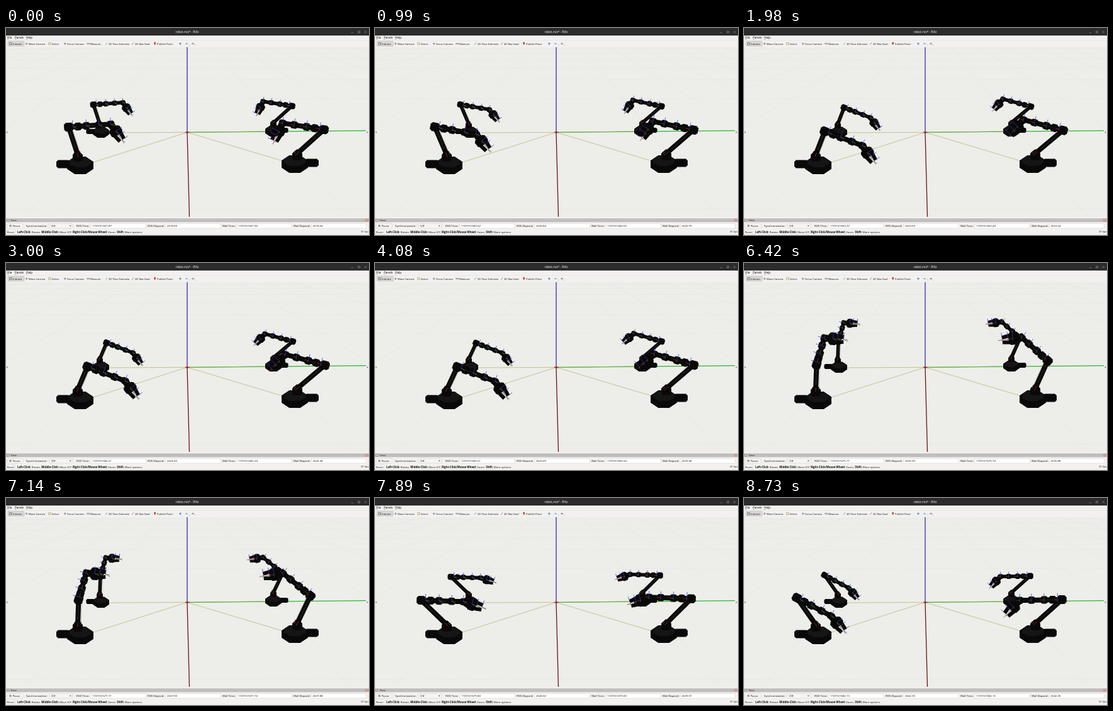
An HTML page with a canvas that plays this animation: 577x330 px, repeating every 8.76 s.

```html
<!DOCTYPE html>
<html lang="en">
<head>
<meta charset="utf-8">
<title>robot.rviz* - RViz</title>
<style>
html, body { margin: 0; width: 100%; height: 100%; overflow: hidden; background: #f2f1f0; }
canvas, svg { position: absolute; left: 0; top: 0; width: 577px; height: 330px; }
text { font: 4.35px "Open Sans", "Noto Sans", sans-serif; fill: #0c0c0c; white-space: pre; }
.menu { font-size: 4.6px; }
.tool { font-size: 4.1px; }
.title { font-size: 4.6px; font-weight: 600; fill: #d4d4d4; text-anchor: middle; }
.bold { font-weight: 700; }
</style>
</head>
<body>
<canvas id="scene"></canvas>
<svg id="ui" viewBox="0 0 577 330"></svg>
<script>
const LOOP = 8760, STEP = 30, RATE = 2.779;
const canvas = document.getElementById('scene');
const ui = document.getElementById('ui');
const g = canvas.getContext('2d');
const dpr = window.devicePixelRatio || 1;
canvas.width = 577 * dpr;
canvas.height = 330 * dpr;

// ---------- window frame ----------
function add(tag, attrs, text = '') {
  const el = document.createElementNS('http://www.w3.org/2000/svg', tag);
  for (const k in attrs) el.setAttribute(k, attrs[k]);
  el.textContent = text;
  return ui.appendChild(el);
}
const rect = (x, y, width, height, fill, stroke = 'none', rx = 0) =>
  add('rect', { x, y, width, height, fill, stroke, rx, 'stroke-width': 0.4 });
const label = (x, y, text, name = '') => add('text', { x, y, class: name }, text);
const path = (d, stroke, w = 0.6, fill = 'none') =>
  add('path', { d, stroke, fill, 'stroke-width': w });
const field = (x, width, fill = '#f6f5f4') => rect(x, 311.8, width, 7.4, fill, '#c4c1be', 1);

function buildTop() {
  rect(0, 0, 577, 12, '#2c2c2c');
  label(288, 8.2, 'robot.rviz* - RViz', 'title');
  path('M549 7.5h2.6M559.6 5h2.8v2.8h-2.8zM570 5l2.8 2.8M572.8 5l-2.8 2.8', '#b8b8b8', 0.5);

  rect(0, 12, 577, 18.5, '#f2f1f0');
  for (const [x, s] of [[2, 'File'], [14, 'Panels'], [32, 'Help']]) {
    label(x, 17.1, s, 'menu');
    path(`M${x} 18h2.4`, '#333', 0.35);
  }
  path('M0 19.7H577', '#dddbd9', 0.4);
  rect(3, 21, 26, 8, '#d9d7d5', '#aaa7a4', 1);

  const box = 'M0 -1.6h3.6v3.2h-3.6z', cross = 'M0 0h4M2 -2v4', slash = 'M0 1.7L3.6 -1.7';
  const pin = 'M2 2L.8 -1A1.2 1.2 0 1 1 3.2 -1z', ruler = 'M0 .7h4.2v-1.4h-4.2z';
  const tools = [[11, 'Interact', '#555', box], [36, 'Move Camera', '#666', cross], [73, 'Select', '#9a9a50', box],
    [97, 'Focus Camera', '#666', cross], [134, 'Measure', '#777', ruler], [163, '2D Pose Estimate', '#2d9b2d', slash],
    [205, '2D Nav Goal', '#a03a90', slash], [240, 'Publish Point', '#c43a2c', pin]];
  for (const [x, s, color, mark] of tools) {
    label(x, 26.6, s, 'tool');
    path(mark, color, 0.7, mark === pin ? color : 'none').setAttribute('transform', `translate(${x - 5.3} 25)`);
  }
  path('M275.2 25h3.6M277 23.2v3.6M285.2 25h3.6', '#3d78b5', 1);
  path('M295.4 25q1.7 -2 3.4 0q-1.7 2 -3.4 0M297 24.6v.8', '#555');
  path('M291 27h1.2M300 27h1.2', '#666');
  path('M2.4 164.8v3L.8 166.3zM573.8 164.8v3l1.6 -1.5z', 'none', 0, '#555');
}

function buildBottom() {
  rect(0, 301, 577, 29, '#f2f1f0');
  rect(0, 303.5, 577, 6, '#bfbebc');
  add('circle', { cx: 3, cy: 306.6, r: 1.5, fill: '#eee', stroke: '#444', 'stroke-width': 0.5 });
  label(7, 308.2, 'Time');
  rect(571.4, 304.7, 3.6, 3.6, '#e8c8c0', '#b04030', 0.5);
  path('M572.4 305.7l1.6 1.6M574 305.7l-1.6 1.6', '#b02020', 0.5);

  field(2, 25);
  path('M6 313.8v3.2M7.8 313.8v3.2', '#333', 0.8);
  label(10.5, 317, 'Pause');
  label(32, 317, 'Synchronization:');
  field(69, 37);
  label(72, 317, 'Off');
  path('M100.8 314.8h2.8l-1.4 1.8z', 'none', 0, '#444');

  rect(0.5, 321.6, 14, 7.6, '#f6f5f4', '#cfccc9', 1);
  label(1.8, 327, 'Reset');
  const help = label(18, 327, '');
  const hints = { 'Left-Click:': ' Rotate. ', 'Middle-Click:': ' Move X/Y. ',
    'Right-Click/Mouse Wheel:': ' Zoom. ', 'Shift:': ' More options.' };
  for (const key in hints) help.append(add('tspan', { class: 'bold' }, key), hints[key]);
  label(564, 326.2, '31 fps');
}

buildTop();
buildBottom();
const clocks = [
  [112, 135, 'ROS Time:', 1729161657.87],
  [225, 254, 'ROS Elapsed:', 2618.09],
  [344, 367, 'Wall Time:', 1729161657.90],
  [457, 485.5, 'Wall Elapsed:', 2618.04]
].map(([x, fx, name, start]) => {
  label(x, 317, name);
  field(fx, 87, '#fff');
  return { start, out: label(fx + 2, 317, '') };
});

// ---------- robot arms ----------
// Key poses: time, outward lean of the upper arm, then drop of forearm and hand, in degrees.
const leftKeys = [
  [0, 18, -4, 55], [600, 39, 6, 51], [1750, -21, 21, 54], [4350, -25, 21, 54], [5130, 4, -61, 24],
  [5900, -2, -74, 4], [7150, -2, -74, 4], [7890, 46, 2, 17], [8250, 51, 9, 41], [8730, 35, 28, 50]
];
const rightKeys = [
  [0, 48, -9, 65], [1980, 50, -15, 49], [5130, 49, -16, 38], [6100, 24, -42, 8],
  [7000, 24, -42, 8], [7890, 45, -2, 19], [8730, 48, 1, 47]
];
// Each side's two arms share one pose; out is the direction away from the centre.
const arms = [
  { base: [146, 165], shoulder: [149, 153], size: 0.7, out: -1, keys: leftKeys },
  { base: [430, 163], shoulder: [425, 151], size: 0.7, out: 1, keys: rightKeys },
  { base: [110, 217], shoulder: [114, 202], size: 1, out: -1, keys: leftKeys },
  { base: [467, 215], shoulder: [463, 200], size: 1, out: 1, keys: rightKeys }
];
const BLACK = '#090909';

const mix = (a, b, k) => a.map((v, i) => v + (b[i] - v) * k);
const rad = deg => deg * Math.PI / 180;

function angles(keys, t) {
  const i = Math.max(1, keys.findIndex(k => k[0] >= t));
  const a = keys[i - 1], b = keys[i];
  const u = (t - a[0]) / (b[0] - a[0]);
  return mix(a, b, u * u * (3 - 2 * u)).slice(1);
}

// Elbow, wrist and tip; the view shortens upright links.
function joints({ shoulder, size, out, keys }, t) {
  const [lean, fore, hand] = angles(keys, t);
  const reach = (p, deg, len) =>
    [p[0] - out * Math.cos(rad(deg)) * len * size, p[1] + Math.sin(rad(deg)) * len * size];
  const E = reach(shoulder, -90 - lean, 40 + 0.35 * Math.max(0, lean));
  const W = reach(E, fore, 42 + 25 * Math.cos(rad(fore)) ** 2);
  return [E, W, reach(W, hand, 31)];
}

function line(a, b, color, w) {
  g.strokeStyle = color;
  g.lineWidth = w;
  g.beginPath();
  g.moveTo(...a);
  g.lineTo(...b);
  g.stroke();
}

function fillShape(points, color) {
  g.fillStyle = color;
  g.beginPath();
  points.forEach(p => g.lineTo(...p));
  g.fill();
}

const octagon = (x, y, rx, ry, color) => fillShape(Array.from({ length: 8 }, (_, i) => {
  const a = (i + 0.5) * Math.PI / 4;
  return [x + Math.cos(a) * rx * 1.08, y + Math.sin(a) * ry * 1.08];
}), color);

// A housing with cut corners, centred on p and turned along a -> b.
function block(p, a, b, w, h, color = BLACK) {
  const c = Math.min(w, h) * 0.22, x = w / 2, y = h / 2;
  g.save();
  g.translate(...p);
  g.rotate(Math.atan2(b[1] - a[1], b[0] - a[0]));
  fillShape([[c - x, -y], [x - c, -y], [x, c - y], [x, y - c], [x - c, y], [c - x, y], [-x, y - c], [-x, c - y]], color);
  g.restore();
}

// Coloured frame ticks: red along the link, blue across it, green sideways.
function axes(p, a, b, s) {
  const d = Math.hypot(b[0] - a[0], b[1] - a[1]);
  const ux = (b[0] - a[0]) / d, uy = (b[1] - a[1]) / d;
  const flip = ux > 0 ? 1 : -1;
  const tick = (x, y, len, color) => line(p, [p[0] + x * len * s, p[1] + y * len * s], color, 0.75);
  tick(ux, uy, 7, '#b82020');
  tick(ux * 0.6 + 0.5, 0.5, 7, '#188c28');
  tick(uy * flip, -ux * flip, 13, '#3038c0');
}

function drawBase({ base: [x, y], shoulder: S, size, out }) {
  const s = size === 1 ? 1 : 0.62;
  const cx = x - out * 8 * s;
  block([x + out * 19 * s, y], [0, 0], [1, 0], 22 * s, 13 * s);
  octagon(cx, y + 2 * s, 21 * s, 14 * s, BLACK);
  octagon(cx, y - 3 * s, 17 * s, 8 * s, '#151515');
  block([S[0], S[1] + 4 * s], [0, 0], [1, 0], 16 * s, 14 * s);
}

function drawArm(arm, t) {
  const [E, W, T] = joints(arm, t);
  const { shoulder: S, size: s, out } = arm;
  drawBase(arm);
  block(S, S, E, 12 * s, 11 * s);

  line([S[0] - out * 5 * s, S[1]], [E[0] - out * 5 * s, E[1]], '#98985c', 0.5);
  line(S, E, BLACK, 8 * s);
  line(mix(S, E, 0.2), mix(S, E, 0.85), '#2c2c2a', s);
  block(E, E, W, 15 * s, 14 * s);

  line(E, W, BLACK, 8 * s);
  for (const k of [0.22, 0.42, 0.72, 1]) block(mix(E, W, k), E, W, 12 * s, (13 - 2 * k) * s);
  line(mix(E, W, 0.15), mix(E, W, 0.6), '#1d1d1d', 0.8 * s);

  const G = mix(W, T, 0.45);
  line(W, G, BLACK, 11 * s);
  block(G, W, T, 14 * s, 20 * s);
  for (const side of [-1, 1]) {
    const n = [(W[1] - T[1]) * 0.2 * side, (T[0] - W[0]) * 0.2 * side];
    line([G[0] + n[0], G[1] + n[1]], [T[0] + n[0] * 0.6, T[1] + n[1] * 0.6], BLACK, 6 * s);
  }

  line(mix(S, E, -0.08), mix(S, E, 0.08), '#b02020', 0.8);
  for (const k of [0.1, 0.42, 0.72, 1]) axes(mix(E, W, k), E, W, s * 0.8);
  for (const k of [0.45, 0.7, 1]) axes(mix(W, T, k), W, T, s * 0.9);
}

// ---------- ground plane ----------
function drawGround() {
  g.fillStyle = '#ededea';
  g.fillRect(0, 30, 577, 271);
  for (let n = -20; n <= 20; n++) {
    if (n) line([288 + n * 15, -4], [288 + n * 270, 317], '#e1e1de', 0.5);
    const depth = 1.1 + 0.434 * n;
    if (n && depth > 0) {
      const y = 166 - 82 * n / depth;
      line([0, y + 0.4], [577, y - 0.4], '#e2e2df', 0.5);
    }
  }
  const O = [288, 166.3];
  line(O, [288, 30], '#2020a0', 1.2);
  line(O, [291.5, 301], '#6c1414', 1.3);
  line(O, [572, 163.7], '#28b828', 1.2);
  for (const p of [[139, 214], [160, 167], [440, 212], [447, 164.6]]) line(O, p, '#acac60', 0.65);
  line([285, 166.4], [291.5, 166.4], '#b82020', 1.6);
  line([288, 164.5], [288, 168], '#701828', 1);
}

function draw(t) {
  g.setTransform(dpr, 0, 0, dpr, 0, 0);
  g.save();
  g.beginPath();
  g.rect(0, 30, 577, 271);
  g.clip();
  drawGround();
  arms.forEach(arm => drawArm(arm, t));
  g.restore();
  for (const c of clocks) c.out.textContent = (c.start + t / 1000 * RATE).toFixed(2);
}

const origin = performance.now();
function tick() {
  const t = Math.max(0, performance.now() - origin) % LOOP;
  draw(Math.floor(t / STEP) * STEP);
  requestAnimationFrame(tick);
}
tick();
</script>
</body>
</html>
```
